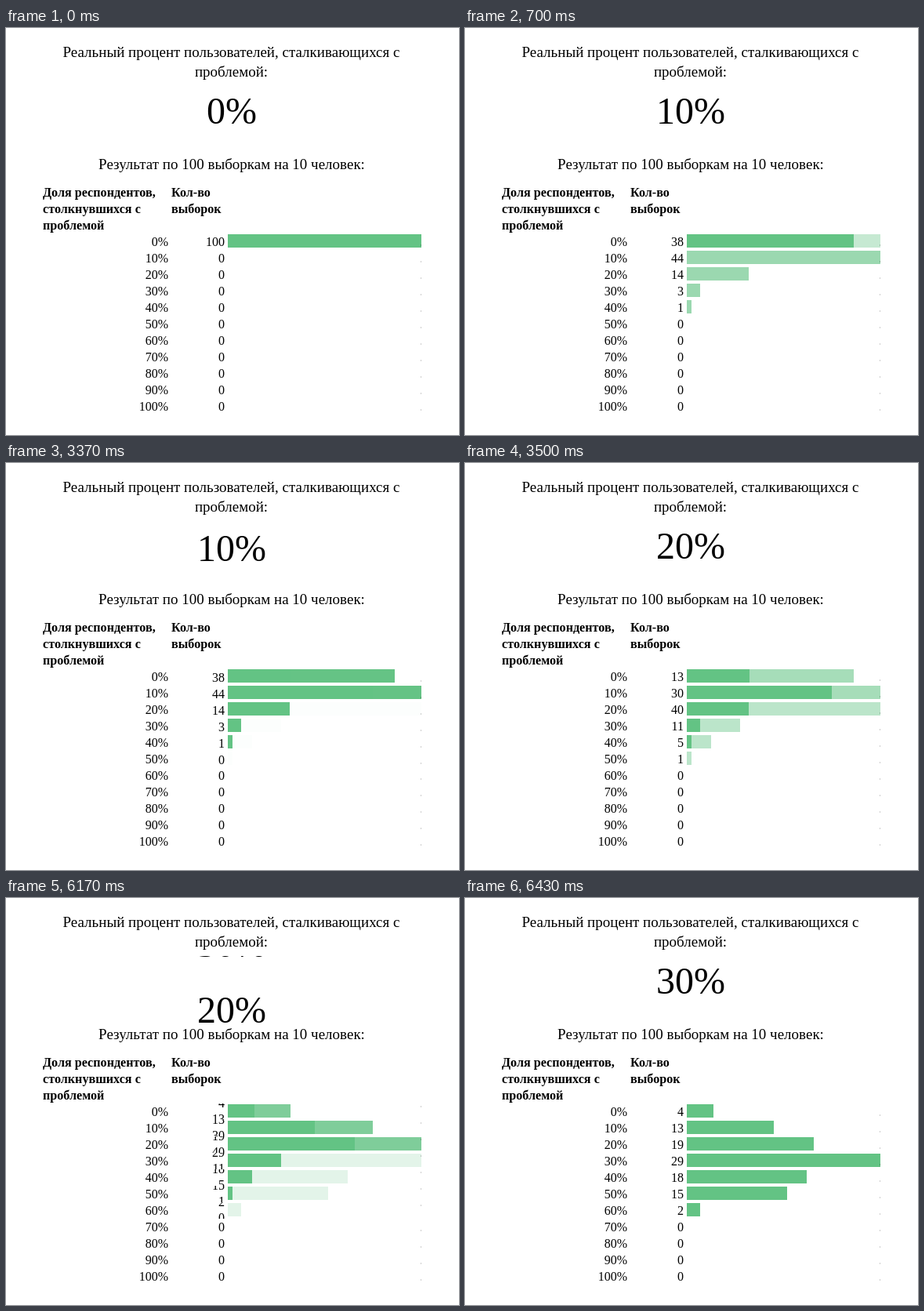
Recreate the animation shown at these times as an HTML page. Size 578 by 519 pixels, loop 8000 ms.

```html
<!DOCTYPE html>
<html lang="ru">
<head>
<meta charset="utf-8">
<style>
html, body { margin: 0; width: 100%; height: 100%; overflow: hidden; background: #fff; }
svg { display: block; font-family: "Liberation Serif", "Times New Roman", serif; font-size: 16px; }
svg svg { overflow: hidden; }
.title { font-size: 19px; text-anchor: middle; }
.big { font-size: 48px; text-anchor: middle; }
.head { font-size: 16.15px; font-weight: bold; }
.num { text-anchor: end; }
.bar { fill: #63c384; }
.dot { fill: #000; opacity: .2; }
</style>
</head>
<body>
<svg id="stage" width="578" height="519" viewBox="0 0 578 519"></svg>
<script>
const LOOP = 8000, TICK = 1000 / 15, PHASE = 29;
const PUSH_MS = 130, FADE_MS = 320;
const ROWS = 11, ROW_H = 21, TOP = 262, BAR_X = 283, BAR_W = 247;
const BIG_SHIFT = 84, ROW_SHIFT = 20;
const stage = document.getElementById('stage');

// when each state starts to arrive, and its sample counts per row
const states = [
  { at: 0, counts: [100] },
  { at: 496, counts: [38, 44, 14, 3, 1] },
  { at: 3362, counts: [13, 30, 40, 11, 5, 1] },
  { at: 6109, counts: [4, 13, 19, 29, 18, 15, 2] }
];

function add(parent, tag, attrs, text) {
  const el = document.createElementNS('http://www.w3.org/2000/svg', tag);
  for (const key in attrs) el.setAttribute(key, attrs[key]);
  if (text) el.textContent = text;
  parent.appendChild(el);
  return el;
}

const label = (cls, x, y, text, parent = stage) => add(parent, 'text', { class: cls, x, y }, text);

// a clipped cell whose content is pushed down by the next one
function slot(y, height) {
  const box = add(stage, 'svg', { x: 0, y, width: 578, height });
  return add(box, 'g', {});
}

label('title', 287.5, 37, 'Реальный процент пользователей, сталкивающихся с');
label('title', 287.5, 62, 'проблемой:');
label('title', 288, 180, 'Результат по 100 выборкам на 10 человек:');
['Доля респондентов,', 'столкнувшихся с', 'проблемой'].forEach((s, i) => label('head', 47, 215 + i * ROW_H, s));
['Кол-во', 'выборок'].forEach((s, i) => label('head', 211, 215 + i * ROW_H, s));

const bigSlot = slot(74, 86);
const [bigOld, bigNew] = [48, 48 - BIG_SHIFT].map(y => label('big', 288, y, '', bigSlot));

const rows = Array.from({ length: ROWS }, (_, i) => {
  const y = TOP + i * ROW_H;
  label('num', 207, y + 16, i * 10 + '%');
  const bar = () => add(stage, 'rect', { class: 'bar', x: BAR_X, y: y + 1, width: 0, height: 17 });
  const solid = bar(), extra = bar();
  const group = slot(y, ROW_H);
  const [old, next] = [16, 16 - ROW_SHIFT].map(base => {
    add(group, 'rect', { class: 'dot', x: 529, y: base - 2, width: 1, height: 2 });
    return label('num', 279, base, '', group);
  });
  return { solid, extra, group, old, next };
});

const shift = (el, dy) => el.setAttribute('transform', `translate(0 ${Math.round(dy)})`);
const count = (state, i) => state.counts[i] || 0;
const barWidth = (state, i) => Math.round(count(state, i) / Math.max(...state.counts) * BAR_W);

function draw(t) {
  const index = states.filter(s => s.at <= t).length - 1;
  const b = states[index], a = states[index - 1] || b;
  const push = Math.min(1, (t - b.at) / PUSH_MS);
  const fade = Math.min(1, (t - b.at) / FADE_MS);

  // the share grows by ten percent per state
  bigOld.textContent = Math.max(0, index - 1) * 10 + '%';
  bigNew.textContent = index * 10 + '%';
  shift(bigSlot, (a === b ? 1 : push) * BIG_SHIFT);

  rows.forEach((row, i) => {
    const from = count(a, i), to = count(b, i);
    row.old.textContent = from;
    row.next.textContent = to;
    shift(row.group, from === to ? 0 : push * ROW_SHIFT);

    const wa = barWidth(a, i), wb = barWidth(b, i), shared = Math.min(wa, wb);
    row.solid.setAttribute('width', shared);
    row.extra.setAttribute('x', BAR_X + shared);
    row.extra.setAttribute('width', Math.abs(wa - wb));
    row.extra.setAttribute('opacity', wa > wb ? 1 - fade : fade);
  });
}

// the picture advances fifteen times a second
const start = performance.now();
let shown;
function frame(now) {
  const t = Math.max(0, now - start) % LOOP;
  const n = Math.floor((t - PHASE) / TICK);
  if (n !== shown) {
    shown = n;
    draw(Math.max(0, (n + .5) * TICK));
  }
  requestAnimationFrame(frame);
}
frame(start);
</script>
</body>
</html>
```
